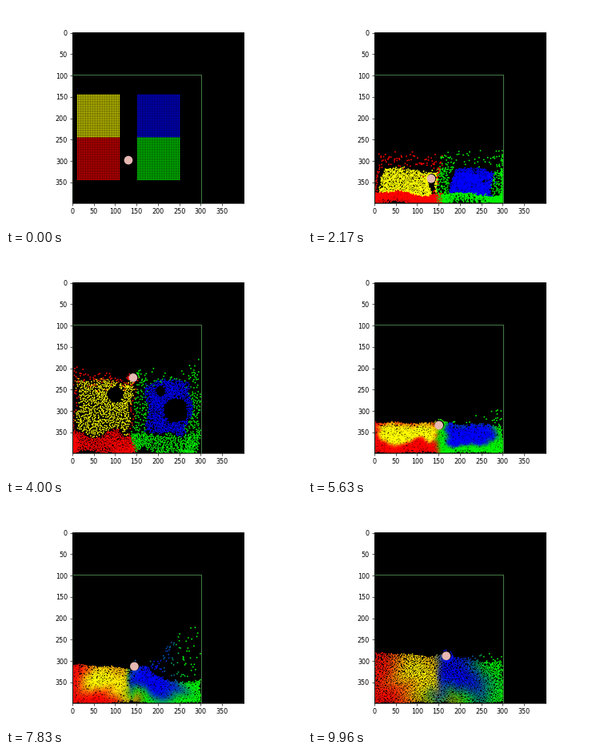
Recreate the animation shown at these times as a matplotlib script. Size 370 by 278 pixels, loop 10000 ms.

```python
import numpy as np
import matplotlib.pyplot as plt
from matplotlib.animation import FuncAnimation
from matplotlib.patches import Circle

rng = np.random.default_rng(7)
SIDE, STEP, SIZE = 25, 4, 400
STEPS, FRAMES, INTERVAL = 240, 250, 40
GRAVITY = 0.19
LEFT, MIDDLE, RIGHT, FLOOR = 2, 142, 297, 397
BALL_R = 10

# Four square blocks of particles, each light block above a heavy one
row, col = np.divmod(np.arange(SIDE * SIDE), SIDE)
corners = [(12, 148), (12, 248), (152, 148), (152, 248)]
start = np.concatenate(
    [np.column_stack([x + STEP * col, y + STEP * row]) for x, y in corners]
).astype(float)
N = len(start)
kind = np.repeat(np.arange(4), SIDE * SIDE)
yellow, red, blue, green = (kind == k for k in range(4))
block_rgb = np.array([(1, 1, 0), (1, 0, 0), (0, 0, 1), (0, 0.95, 0)])[kind]
u = np.tile((col + 0.5) / SIDE, 4)
v = np.tile((row + 0.5) / SIDE, 4)
noise = rng.normal(size=(N, 2))


def clip(p):
    p[:, 0] = np.clip(p[:, 0], LEFT, RIGHT)
    p[:, 1] = np.minimum(p[:, 1], FLOOR)
    return p


def pairs(p, reach):
    """All ordered neighbour pairs closer than reach, from a sorted cell grid."""
    cell = (p // reach).astype(int) + 2
    key = cell[:, 1] * 1000 + cell[:, 0]
    order = np.argsort(key)
    key = key[order]
    first, second = [], []
    for shift in (-1000, 0, 1000):
        a = np.searchsorted(key, key + shift - 1)
        count = np.searchsorted(key, key + shift + 1, "right") - a
        i = np.repeat(np.arange(N), count)
        first.append(i)
        second.append(np.arange(len(i)) - np.repeat(np.cumsum(count) - count - a, count))
    i, j = order[np.concatenate(first)], order[np.concatenate(second)]
    off = p[i] - p[j]
    r = np.hypot(*off.T)
    near = (r < reach) & (i != j)
    return i[near], j[near], off[near], r[near] + 1e-6


def gather(i, values):
    return np.column_stack([np.bincount(i, x, minlength=N) for x in values.T])


def relax(p, d, rounds):
    for _ in range(rounds):
        i, _, off, r = pairs(p, d)
        move = gather(i, off * (0.28 * (d - r) / r)[:, None])
        p = clip(p + np.clip(move, -1.5, 1.5))
    return p


def mix(rgb, p, reach, rate):
    i, j, _, _ = pairs(p, reach)
    count = np.bincount(i, minlength=N)[:, None]
    mean = gather(i, rgb[j]) / np.maximum(count, 1)
    return rgb + rate * (mean - rgb) * (count > 0)


def spacing(level):
    """Even particle distance when the pool is filled up to level."""
    area = (RIGHT - LEFT) * (FLOOR - level)
    return min(3.8, 0.95 * np.sqrt(1.155 * area / N))


def falling(n):
    """Free fall with a soft landing that squeezes and spreads the bottom."""
    p = start.copy()
    p[:, 1] += 0.5 * GRAVITY * n * n
    deep = np.maximum(p[:, 1] - 370, 0)
    p[:, 1] -= deep - 28 * (1 - np.exp(-deep / 28))
    p += noise * (deep / 70)[:, None] * [12, 4]
    return clip(p)


def wobble(p, size):
    """Divergence-free bending by a few random waves."""
    for _ in range(4):
        k = rng.normal(size=2) * 0.06
        across = np.array([-k[1], k[0]]) / np.hypot(*k)
        p = p + size * np.sin(p @ k + rng.uniform(0, 6.3))[:, None] * across
    return p


def rebound(top, bubbles=()):
    """Heavy blocks form the bed, climb the sides and spill over the light ones."""
    p = np.empty_like(start)
    bed = FLOOR - 0.28 * (FLOOR - top)
    halves = [(yellow, red, LEFT, MIDDLE, 0.06), (blue, green, MIDDLE, RIGHT, 0.2)]
    for light, heavy, x0, x1, curl in halves:
        inset = curl + (1 - 2 * curl) * u
        spread = (u - curl) / (1 - 2 * curl)
        wall = (u < curl) | (u > 1 - curl)
        x = np.where(light, inset, np.where(wall, u, spread))
        y = np.where(light, top + (bed - top) * v,
                     np.where(wall, top + (FLOOR - top) * v, bed + (FLOOR - bed) * v))
        crest = heavy & (v < 0.12)
        y[crest] = top - 5 + 12 * rng.normal(size=crest.sum())
        half = light | heavy
        p[half] = np.column_stack([x0 + (x1 - x0) * x, y])[half]
    p = wobble(p + rng.normal(size=p.shape) * 2, 5)
    for x, y, r in bubbles:
        off = p - (x, y)
        dist = np.hypot(*off.T) + 1e-6
        far = np.sqrt(r * r + 0.75 * dist ** 2)
        p = p + off * np.where(dist < 2 * r, far / dist - 1, 0)[:, None]
    return relax(clip(p), spacing(top), 12)


def stir(p, angle):
    """Roll each half of the pool outwards along the bed."""
    p = p.copy()
    for x0, x1, sign in ((LEFT, MIDDLE, 1), (MIDDLE, RIGHT, -1)):
        half = (p[:, 0] >= x0) & (p[:, 0] < x1)
        centre, radius = np.array([(x0 + x1) / 2, 362]), np.array([72, 36])
        e = (p[half] - centre) / radius
        turn = sign * angle * np.clip(1.6 - np.hypot(*e.T), 0, 1)
        c, s = np.cos(turn), np.sin(turn)
        turned = np.column_stack([c * e[:, 0] - s * e[:, 1], s * e[:, 0] + c * e[:, 1]])
        p[half] = centre + turned * radius
    return p


def surface(x, level, slosh):
    tilt = np.cos(np.pi * x / RIGHT)
    mound = np.exp(-((x - 168) / 24) ** 2)
    return level - slosh * (tilt + mound)


def pour(prev, level, slosh, spray):
    """Settle under a sloshing surface, with drops thrown up on the right."""
    xs = np.linspace(LEFT, RIGHT, 150)
    area = np.cumsum(FLOOR - surface(xs, level, slosh))
    order = np.argsort(prev[:, 0])
    p, rank = np.empty_like(prev), np.empty(N)
    p[order, 0] = np.interp((np.arange(N) + 0.5) / N, area / area[-1], xs)
    for column in np.array_split(order, 70):
        by_height = column[np.argsort(prev[column, 1])]
        rank[by_height] = (np.arange(len(column)) + 0.5) / len(column)
    top = surface(p[:, 0], level, slosh)
    p[:, 1] = top + (FLOOR - top) * rank ** 0.9
    p = relax(clip(wobble(p + rng.normal(size=p.shape), 1.5)), spacing(level), 12)
    loose = np.flatnonzero((rank < 0.15) & (p[:, 0] > 178))
    loose = loose[np.argsort(prev[loose, 1])][:spray // 2]
    reach = (p[loose, 0] - 160) / (RIGHT - 160)
    p[loose, 1] = top[loose] - spray * reach * rng.random(len(loose))
    return clip(p)


poses = [
    (28, 360, falling(28)), (32, 360, falling(32)), (46, 320, rebound(320)),
    (71, 262, rebound(262, [(65, 275, 14), (250, 312, 15), (222, 270, 18)])),
    (96, 232, rebound(232, [(100, 262, 20), (240, 300, 30), (205, 255, 14)])),
]
# time, level, slosh, spray height
tides = [(135, 331, 2, 40), (150, 331, 0, 30), (170, 328, 8, 120),
         (188, 325, 17, 165), (212, 305, 12, 70), (239, 291, 8, 20)]
for n, level, slosh, spray in tides:
    prev = poses[-1][2]
    rolled = stir(prev, 0.35) if n > tides[0][0] else prev
    poses.append((n, level, pour(rolled, level, slosh, spray)))


def spline(t, p):
    """Smooth curve through key points p at times t."""
    t, p = np.array(t, float), np.array(p, float)
    m = np.gradient(p, t, axis=0)

    def at(n):
        k = int(np.clip(np.searchsorted(t, n, "right") - 1, 0, len(t) - 2))
        h = t[k + 1] - t[k]
        s = (n - t[k]) / h
        a, b = (1 + 2 * s) * (1 - s) ** 2, s * s * (3 - 2 * s)
        return a * p[k] + b * p[k + 1] + h * s * (1 - s) * ((1 - s) * m[k] - s * m[k + 1])
    return at


pose_t, pose_level, pose_p = zip(*poses)
flow = spline(pose_t, pose_p)
bob = spline([28, 32, 44, 71, 84, 96, 135, 188, 239],
             [(131, 372.5), (130, 385), (131, 378), (138, 224), (140, 209),
              (142, 222), (151, 335), (145, 312), (168, 288)])


def target(n):
    return falling(n) if n <= 32 else clip(flow(n))


def ball_at(n):
    return np.array([131, 298 + 0.5 * GRAVITY * n * n]) if n <= 30 else bob(n)


def simulate():
    p, rgb, last = start.copy(), block_rgb, start
    states = [(p, rgb)]
    for n in range(1, STEPS):
        goal = target(n)
        p = p + goal - last
        p += 0.15 * (goal - p)
        last = goal
        if n >= 20:
            d = spacing(np.interp(n, pose_t, pose_level))
            p = relax(clip(p), d, 2)
            rgb = mix(rgb, p, 1.3 * d, 0.3 * np.clip((n - 85) / 70, 0, 1))
        off = p - ball_at(n)
        r = np.hypot(*off.T) + 1e-6
        p = clip(p + off * np.where(r < 12.2, 12.2 / r - 1, 0)[:, None])
        states.append((p, rgb))
    return states


states = simulate()


def raster(n):
    p, rgb = states[n]
    img = np.zeros((SIZE, SIZE, 3), np.uint8)
    x, y = np.rint(p).astype(int).T
    for dy in (-1, 0, 1):
        for dx in (-1, 0, 1):
            img[y + dy, x + dx] = np.clip(rgb * 255, 0, 255)
    return img


DPI = 370 / 6.4
fig, ax = plt.subplots(figsize=(370 / DPI, 278 / DPI), dpi=DPI)
picture = ax.imshow(raster(0), interpolation="catrom")
ax.set_xticks(range(0, SIZE, 50))
ax.set_yticks(range(0, SIZE, 50))
ax.plot([0, 301.5, 301.5], [97, 97, 399.5], color="#437a43", lw=72 / DPI)
ax.plot([1, 1], [97, 399.5], color="#1e371e", lw=72 / DPI)
ax.set_xlim(-0.5, SIZE - 0.5)
ax.set_ylim(SIZE - 0.5, -0.5)
ball = ax.add_patch(Circle(ball_at(0), BALL_R, fc="#e6b8b2", ec="none", zorder=3))


def draw(i):
    n = min(round(i * STEPS / FRAMES), STEPS - 1)
    picture.set_data(raster(n))
    ball.center = ball_at(n)
    return picture, ball


anim = FuncAnimation(fig, draw, frames=FRAMES, interval=INTERVAL, repeat=True, repeat_delay=0)
plt.show()
```
